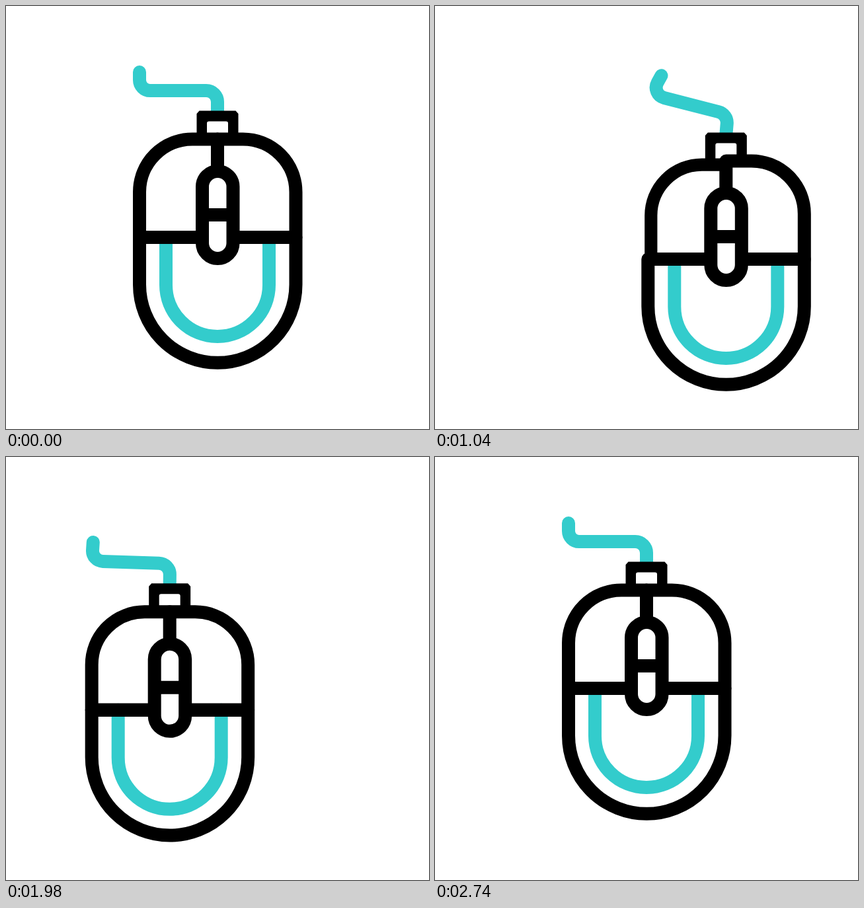
Write an HTML page that moves like this. It is 640x640 px and loops after 3140 ms.

```html
<!DOCTYPE html>
<html lang="en">
<head>
<meta charset="utf-8">
<title>Computer mouse</title>
<style>
  html, body { margin: 0; height: 100%; overflow: hidden; background: #fff; }
  svg { display: block; width: 100vw; height: 100vh; }
  g { fill: none; stroke: #000; stroke-width: 20; stroke-linecap: round; stroke-linejoin: round; }
  .teal { stroke: #3cc; }
</style>
</head>
<body>
<svg viewBox="0 0 640 640">
  <g id="mouse">
    <path id="cable" class="teal"/>
    <path fill="#000" stroke="none" d="M288.500 200V163l4-4.500h55l4 4.500V200H336V177.500q0-3-3-3H307q-3 0-3 3V200Z"/>
    <path class="teal" d="M242 350V422a78 78 0 0 0 156 0V350"/>
    <path d="M202 350V421.500a118 118 0 0 0 236.500 0V350Z"/>
    <path id="left" d="M320 350H202V281.500a80 80 0 0 1 80-80H320"/>
    <path id="right" d="M320 350H438.500V281.500a80 80 0 0 0-80-80H320V250"/>
    <rect x="297" y="250" width="46.500" height="132" rx="23.250" fill="#fff"/>
    <path d="M300 316H340"/>
  </g>
</svg>
<script>
const LOOP = 3140;
const QUARTER = Math.PI / 2;
const el = id => document.getElementById(id);

// Smooth rise from 0 to 1 between two times.
function ease(t, from, to) {
  const u = Math.min(1, Math.max(0, (t - from) / (to - from)));
  return u * u * (3 - 2 * u);
}

// A bent cable: straight parts joined by round corners, each tilted further than the last.
function cablePath(bend) {
  let x = 320, y = 162, heading = bend / 3 - QUARTER, d = `M${x} ${y}`;
  const move = (dist, angle) => {
    x += dist * Math.cos(angle);
    y += dist * Math.sin(angle);
  };
  const line = length => {
    move(length, heading);
    d += `L${x} ${y}`;
  };
  const corner = (r, turn) => {
    move(2 * r * Math.sin(Math.abs(turn) / 2), heading + turn / 2);
    heading += turn;
    d += `A${r} ${r} 0 0 ${turn > 0 ? 1 : 0} ${x} ${y}`;
  };
  line(17);
  corner(17, bend * 2 / 3 - QUARTER);
  line(85);
  corner(16, bend + QUARTER);
  line(12);
  return d;
}

// The button shrinks towards the middle of the mouse and springs back.
function press(id, t, mid) {
  const depth = ease(t, mid - 110, mid - 10) - ease(t, mid + 10, mid + 100);
  el(id).setAttribute('transform', `translate(320 350) scale(${1 - .038 * depth}) translate(-320 -350)`);
}

function draw() {
  const t = performance.now() % LOOP;
  const toRight = ease(t, 380, 705);
  const toLeft = ease(t, 1138, 1428);
  const toHome = ease(t, 1820, 2160);

  const x = 120.3 * toRight - 254.3 * toLeft + 134 * toHome;
  const y = 33 * toRight + 39.5 * toLeft - 86.2 * toHome
    + 31 * ease(t, 2160, 2355) - 17.3 * ease(t, 2355, 2740);
  const bend = -.16 * ease(t, 200, 380) + .305 * toRight + .11 * ease(t, 705, 1080)
    - .34 * ease(t, 1080, 1540) + .255 * toHome
    - .275 * ease(t, 2160, 2540) + .105 * ease(t, 2540, 2740);

  el('mouse').setAttribute('transform', `translate(${x} ${y})`);
  el('cable').setAttribute('d', cablePath(bend));
  press('left', t, 1040);
  press('right', t, 1640);
  requestAnimationFrame(draw);
}
draw();
</script>
</body>
</html>
```
